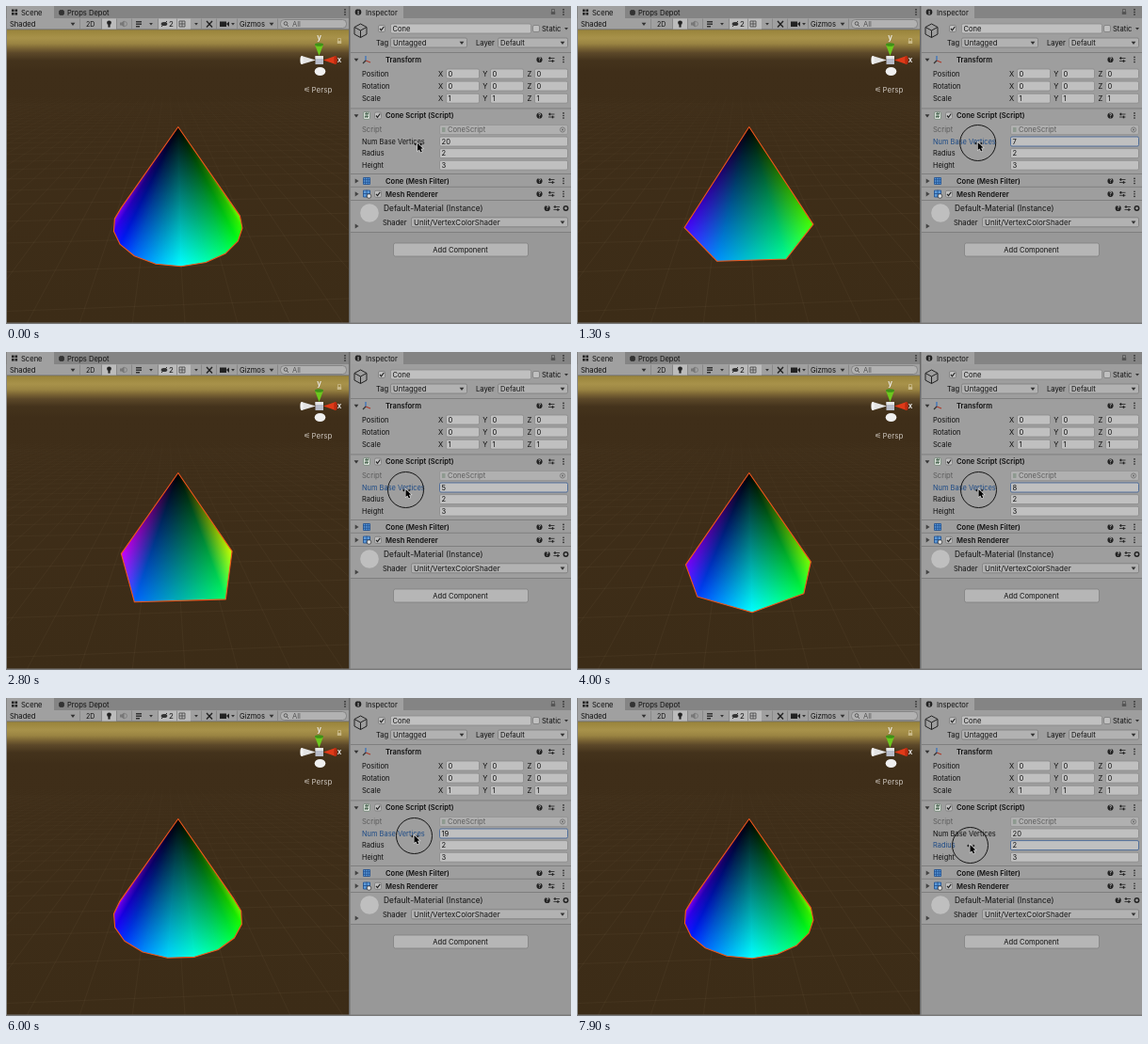
Animation of 600 by 338 pixels, one loop 8000 ms. Source, as an HTML page with a canvas:

```html
<!DOCTYPE html>
<html lang="en">
<head>
<meta charset="utf-8">
<title>Cone inspector</title>
<style>
html, body { margin: 0; width: 100%; height: 100%; overflow: hidden; background: #a0a0a0; }
canvas { display: block; width: 600px; height: 338px; }
</style>
</head>
<body>
<canvas id="stage"></canvas>
<script>
const canvas = document.getElementById('stage');
const dpr = window.devicePixelRatio || 1;
canvas.width = 600 * dpr;
canvas.height = 338 * dpr;
const g = canvas.getContext('2d');
g.scale(dpr, dpr);

const INK = '#101010', BODY = '#9e9e9e', FIELD = '#c0c0c0', LINE = '#7c7c7c', BLUE = '#1c4a86';
const TAU = Math.PI * 2;

// [time, value...] keys, joined linearly
const count = [[0, 20], [300, 20], [1200, 7], [2100, 3], [2800, 5], [4000, 8], [4900, 13], [5900, 19], [6300, 20]];
const mouse = [[0, 437, 146], [300, 437, 146], [1300, 425.7, 145], [2800, 424.5, 146], [4000, 426.5, 146],
  [4900, 430.5, 146], [6000, 433.5, 146], [6600, 434, 146], [7200, 417.5, 156]];

function at(keys, t) {
  const i = keys.findIndex(k => k[0] > t);
  if (i < 0) return keys[keys.length - 1].slice(1);
  const a = keys[i - 1], b = keys[i], u = (t - a[0]) / (b[0] - a[0]);
  return a.slice(1).map((v, j) => v + (b[j + 1] - v) * u);
}

function rect(x, y, w, h, fill) {
  g.fillStyle = fill;
  g.fillRect(x, y, w, h);
}
function box(x, y, w, h, fill, edge = LINE, r = 1.5) {
  g.beginPath();
  g.roundRect(x + .5, y + .5, w - 1, h - 1, r);
  g.fillStyle = fill;
  g.fill();
  g.strokeStyle = edge;
  g.lineWidth = .8;
  g.stroke();
}
function text(s, x, y, { size = 7.6, weight = 400, color = INK, align = 'left' } = {}) {
  g.font = `${weight} ${size}px Inter, "Liberation Sans", sans-serif`;
  g.textAlign = align;
  g.textBaseline = 'alphabetic';
  g.fillStyle = color;
  g.fillText(s, x, y);
}
function trace(points, close) {
  g.beginPath();
  points.forEach(([x, y]) => g.lineTo(x, y));
  if (close) g.closePath();
}
function shape(fill, ...points) {
  trace(points, true);
  g.fillStyle = fill;
  g.fill();
}
function stroke(color, width, ...points) {
  trace(points);
  g.strokeStyle = color;
  g.lineWidth = width;
  g.stroke();
}
function disc(x, y, rx, fill, ry = rx) {
  g.beginPath();
  g.ellipse(x, y, rx, ry, 0, 0, TAU);
  g.fillStyle = fill;
  g.fill();
}
function ring(x, y, r, color, width = 1) {
  g.beginPath();
  g.arc(x, y, r, 0, TAU);
  g.strokeStyle = color;
  g.lineWidth = width;
  g.stroke();
}
const down = (x, y, s = 2.4, c = '#333') => shape(c, [x - s, y - s / 2], [x + s, y - s / 2], [x, y + s * .8]);
const right = (x, y, s = 2.6, c = '#444') => shape(c, [x - s / 2, y - s], [x + s, y], [x - s / 2, y + s]);
function kebab(x, y) {
  for (const d of [-2.6, 0, 2.6]) disc(x, y + d, .8, '#222');
}
function lock(x, y, c) {
  rect(x - 2.2, y, 4.4, 3, c);
  stroke(c, .8, [x - 1.5, y], [x - 1.5, y - 2.5], [x + 1.5, y - 2.5], [x + 1.5, y]);
}
function check(x, y, on) {
  box(x - 4, y - 4, 8, 8, FIELD);
  if (on) stroke('#222', 1.2, [x - 2, y], [x - .5, y + 1.8], [x + 2.3, y - 2]);
}

// Ground plane to screen: x to the right, z towards the viewer, unit = base radius
const TURN = .04;
function ground(x, z) {
  const c = Math.cos(TURN), s = Math.sin(TURN);
  const w = 1 - .24 * (z * c - x * s);
  return [182.5 + 66.5 * (x * c + z * s) / w, 59 + 165.5 / w];
}

function drawGrid() {
  const fade = g.createLinearGradient(0, 62, 0, 220);
  fade.addColorStop(0, 'rgba(190,165,130,0)');
  fade.addColorStop(1, 'rgba(190,165,130,.07)');
  for (let k = -40; k <= 40; k++) {
    stroke(fade, .8, ground(k / 2, 1.9), ground(k / 2, -14));
    if (k < 4 && k > -24) stroke(fade, .8, ground(-20, k / 2), ground(20, k / 2));
  }
}

// Additive ramp from the edge p-q up to corner v
function ramp(v, p, q, color) {
  const dx = q[0] - p[0], dy = q[1] - p[1];
  const u = ((v[0] - p[0]) * dx + (v[1] - p[1]) * dy) / (dx * dx + dy * dy);
  const grad = g.createLinearGradient(p[0] + u * dx, p[1] + u * dy, v[0], v[1]);
  grad.addColorStop(0, '#000');
  grad.addColorStop(1, color);
  shape(grad, v, p, q);
}

function drawCone(n) {
  const apex = [182.8, 128.5], rim = [];
  for (let i = 0; i < n; i++) {
    const a = Math.PI * (1 - 2 * i / n);
    rim.push({ p: ground(Math.sin(a), Math.cos(a)), color: `hsl(${360 * i / n}, 100%, 50%)` });
  }
  const faces = rim.map((a, i) => [a, rim[(i + 1) % n]]).filter(([{ p }, { p: q }]) =>
    (p[0] - apex[0]) * (q[1] - apex[1]) > (p[1] - apex[1]) * (q[0] - apex[0]));
  const outline = [apex, faces[0][0].p, ...faces.map(f => f[1].p)];
  shape('#000', ...outline);
  g.globalCompositeOperation = 'lighter';
  for (const [a, b] of faces) {
    ramp(a.p, apex, b.p, a.color);
    ramp(b.p, apex, a.p, b.color);
  }
  g.globalCompositeOperation = 'source-over';
  trace(outline, true);
  g.strokeStyle = '#f0561c';
  g.lineWidth = 1.1;
  g.lineJoin = 'round';
  g.stroke();
}

function drawAxes() {
  shape('#e4e4e4', [329, 57.5], [314, 53], [314, 62]);
  disc(314, 57.5, 1.6, '#f4f4f4', 4.5);
  shape('#e03a18', [337, 57.5], [350, 53], [350, 62]);
  disc(350, 57.5, 1.7, '#b82a10', 4.5);
  shape('#6cc81e', [332.5, 53], [328, 41], [337, 41]);
  disc(332.5, 41, 4.5, '#3f8f18', 1.8);
  rect(328.5, 53, 8.5, 9, '#b8bcc8');
  rect(328.5, 53, 8.5, 3, '#e6e6e6');
  disc(333.5, 69.5, 5.8, '#f0f0f0', 4.6);
  text('y', 332.5, 36, { size: 8, color: '#eee', align: 'center', weight: 600 });
  text('x', 354, 60, { size: 8, color: '#eee', align: 'center', weight: 600 });
  lock(354, 37, '#c9b988');
  for (const d of [-2.3, 0, 2.3]) stroke('#b5aca2', .8, [317, 88.7 + d * .3], [322, 88.7 + d]);
  text('Persp', 324.5, 91.5, { size: 8, color: '#c9c2ba' });
}

function drawScene(n) {
  g.save();
  g.beginPath();
  g.rect(1, 25, 363, 312);
  g.clip();
  const sky = g.createLinearGradient(0, 25, 0, 338);
  [[25, '#98833a'], [34, '#a8924a'], [40, '#9a8442'], [45, '#7a6434'], [50, '#5c4829'], [58, '#44331c'], [70, '#3f2e19'], [338, '#3c2c17']]
    .forEach(([y, c]) => sky.addColorStop((y - 25) / 313, c));
  rect(0, 25, 364, 313, sky);
  drawGrid();
  drawCone(n);
  drawAxes();
  g.restore();
}

function drawToolbar() {
  rect(0, 0, 365, 13, '#848484');
  rect(1, 0, 50, 13, '#a0a0a0');
  rect(0, 13, 365, 12, '#a0a0a0');
  rect(0, 24.5, 365, .8, '#696969');
  for (const x of [6, 9.5]) for (const y of [3.5, 7]) rect(x, y, 2.6, 2.6, '#222');
  text('Scene', 16, 9.8);
  box(56, 4, 6, 6, '#333', '#333');
  text('Props Depot', 65, 9.8);
  kebab(360, 6.5);
  text('Shaded', 4, 21.8);
  down(71, 19);
  text('2D', 85, 21.6, { size: 7 });
  rect(102, 13.5, 15, 11, '#bcbcbc');
  rect(162, 13.5, 34, 11, '#bcbcbc');
  for (const x of [78, 101, 117, 133, 161, 181, 207, 223, 245, 288]) rect(x, 13.5, .8, 11, '#848484');
  disc(109.5, 17.8, 2.4, '#222');
  rect(108.4, 20, 2.2, 2.6, '#222');
  shape('#777', [121, 17.5], [123, 17.5], [125.5, 15.5], [125.5, 22.5], [123, 20.5], [121, 20.5]);
  ring(126, 19, 2.5, '#777', .7);
  rect(138, 16, 6, 1.5, '#333');
  rect(138, 18.5, 6, 1.5, '#333');
  rect(138, 21, 4, 1.5, '#333');
  down(154, 19, 1.9);
  disc(168, 19, 3.3, '#333', 2);
  stroke('#333', 1, [165, 22], [171, 16]);
  text('2', 173, 22, { size: 8 });
  for (const d of [0, 3, 6]) {
    stroke('#333', .7, [184, 16 + d], [190, 16 + d]);
    stroke('#333', .7, [184 + d, 16], [184 + d, 22]);
  }
  down(202, 19, 1.9);
  stroke('#222', 1.4, [213, 16], [219, 22.5]);
  stroke('#222', 1.4, [219, 16], [213, 22.5]);
  rect(227, 16.5, 7, 5.5, '#222');
  shape('#222', [234, 19], [237, 16.5], [237, 22]);
  down(241, 19, 1.9);
  text('Gizmos', 248, 21.8);
  down(282, 19);
  box(291, 14, 71, 10, '#b2b2b2', LINE, 4);
  ring(297, 18.5, 1.8, '#444', .8);
  stroke('#444', .8, [298.3, 20], [300, 22]);
  text('All', 304, 21.7, { color: '#555' });
}

function header(y, title, open) {
  rect(366, y - 8, 234, .9, LINE);
  (open ? down : right)(372, y);
  text(title, 403, y + 2.8, { weight: 600 });
  tools(y, 566.5, 579, 592);
}
function tools(y, help, preset, menu, last = kebab) {
  disc(help, y, 3.1, '#222');
  text('?', help, y + 2.1, { size: 5.5, weight: 700, color: '#b0b0b0', align: 'center' });
  for (const d of [-1.5, 1.5]) {
    stroke('#222', .8, [preset - 3, y + d], [preset + 3.5, y + d]);
    rect(preset + d - .7, y + d - 1.3, 1.4, 2.6, '#222');
  }
  last(menu, y);
}
const gear = (x, y) => ring(x, y, 2.2, '#222', 1.5);

function dropdown(x, y, w, s, size) {
  box(x, y - 5.5, w, 11, '#b2b2b2');
  text(s, x + 3, y + 2.8, { size });
  down(x + w - 6, y);
}
function field(x, y, w, s, focus) {
  box(x, y - 5.5, w, 11, FIELD, focus ? '#3a5f95' : '#8a8a8a');
  text(s, x + 2.5, y + 2.8);
}

function drawInspector(n, focus) {
  rect(365, 0, 235, 338, BODY);
  rect(366, 241, 234, 97, '#989898');
  rect(364, 0, 1.5, 338, '#696969');
  rect(366, 0, 234, 13, '#848484');
  rect(366, 0, 56, 13, '#a0a0a0');
  disc(374, 6.5, 3.3, '#222');
  text('i', 374, 9, { size: 6, weight: 700, color: '#ccc', align: 'center' });
  text('Inspector', 382, 9.8);
  lock(581, 6, '#555');
  kebab(592, 6.5);

  trace([[376.5, 19], [383, 22.5], [383, 30], [376.5, 33.5], [370, 30], [370, 22.5]], true);
  g.strokeStyle = '#222';
  g.lineWidth = 1;
  g.stroke();
  stroke('#222', 1, [370, 22.5], [376.5, 26], [383, 22.5]);
  stroke('#222', 1, [376.5, 26], [376.5, 33.5]);
  check(399, 24, true);
  field(408, 24, 150, 'Cone');
  check(563, 24, false);
  text('Static', 569, 26.8);
  down(595, 24, 2);
  text('Tag', 393, 41.8);
  dropdown(408, 39, 82, 'Untagged');
  text('Layer', 499, 41.8);
  dropdown(522, 39, 75, 'Default');

  header(57, 'Transform', true);
  stroke('#2f6fc0', 1.2, [382, 53], [382, 58]);
  stroke('#b03a2a', 1.2, [382, 58], [387, 60]);
  stroke('#333', 1.2, [382, 58], [379, 61]);
  ['Position', 'Rotation', 'Scale'].forEach((name, i) => {
    const y = 72 + i * 13.1;
    text(name, 378, y + 2.8);
    ['X', 'Y', 'Z'].forEach((axis, j) => {
      text(axis, 459 + j * 47.3, y + 2.8);
      field(467 + j * 47, y, 36, i === 2 ? '1' : '0');
    });
  });

  header(116.5, 'Cone Script (Script)', true);
  box(379, 112, 8, 9, '#d5dcd5', '#77887a');
  text('#', 383, 119.3, { size: 7, weight: 700, color: '#3c5a44', align: 'center' });
  check(395, 116.5, true);
  text('Script', 378, 134.3, { color: '#5c5c5c' });
  box(460, 126, 137, 11, '#b0b0b0', '#929292');
  rect(463, 129, 3.5, 5, '#8e9a90');
  text('ConeScript', 469, 134.3, { color: '#5c5c5c' });
  ring(591, 131.5, 2.6, '#666', .7);
  disc(591, 131.5, 1, '#666');
  [['Num Base Vertices', n], ['Radius', 2], ['Height', 3]].forEach(([name, value], i) => {
    const y = 144 + i * 12.6, on = focus === i + 1;
    text(name, 378, y + 2.8, { size: 7.45, color: on ? BLUE : INK });
    field(460, y, 137, value, on);
  });

  header(186, 'Cone (Mesh Filter)');
  box(379, 182, 8, 8, '#5e9bd8', '#1d4f90', 0);
  for (const d of [2.7, 5.3]) {
    stroke('#1d4f90', .8, [379 + d, 182], [379 + d, 190]);
    stroke('#1d4f90', .8, [379, 182 + d], [387, 182 + d]);
  }
  header(199.8, 'Mesh Renderer');
  box(379, 195.5, 8, 8, '#5e9bd8', '#1d4f90', 0);
  stroke('#1d4f90', .8, [379, 199.5], [387, 199.5]);
  stroke('#1d4f90', .8, [383, 195.5], [383, 203.5]);
  disc(385.5, 202, 2.3, '#ddd');
  ring(385.5, 202, 2.3, '#333', .7);
  check(395, 199.8, true);

  rect(366, 206, 234, .9, LINE);
  disc(386, 220, 9.8, '#bfbfbf');
  text('Default-Material (Instance)', 401, 218, { size: 8.35 });
  tools(215, 574.7, 584.5, 594.5, gear);
  text('Shader', 400, 232.8);
  dropdown(430, 229.8, 167, 'Unlit/VertexColorShader', 8);
  right(372, 234);
  rect(366, 240, 234, .9, LINE);
  box(411, 251.5, 144, 15, '#b6b6b6', '#808080', 2);
  text('Add Component', 482.5, 261.8, { align: 'center' });
}

function drawMouse([x, y], pressed) {
  if (pressed) ring(x, y + .5, 19, '#151515', 1);
  trace([[x, y], [x, y + 8], [x + 1.9, y + 6.4], [x + 3.3, y + 9.4], [x + 4.8, y + 8.7], [x + 3.4, y + 5.8], [x + 5.8, y + 5.6]], true);
  g.lineWidth = 1.2;
  g.strokeStyle = '#ddd';
  g.stroke();
  g.fillStyle = '#000';
  g.fill();
  shape('#111', [x - 3.5, y + 1], [x - 1.5, y - .5], [x - 1.5, y + 2.5]);
  shape('#111', [x + 5, y + 1], [x + 3, y - .5], [x + 3, y + 2.5]);
}

const start = performance.now();
function frame(now) {
  const t = Math.floor(Math.max(0, now - start) % 8000 / 100) * 100;
  const vertices = time => Math.round(at(count, Math.max(0, time))[0]);
  const focus = t < 300 ? 0 : t < 7400 ? 1 : 2;
  drawScene(vertices(t));
  drawToolbar();
  drawInspector(vertices(t - 100), focus); // the field repaints one step after the mesh
  rect(0, 13, 1, 325, '#8a8a8a');
  rect(0, 336.5, 600, 1.5, '#7a7a7a');
  drawMouse(at(mouse, t), t >= 300 && t < 6500 || t >= 7400);
  requestAnimationFrame(frame);
}
requestAnimationFrame(frame);
</script>
</body>
</html>
```
